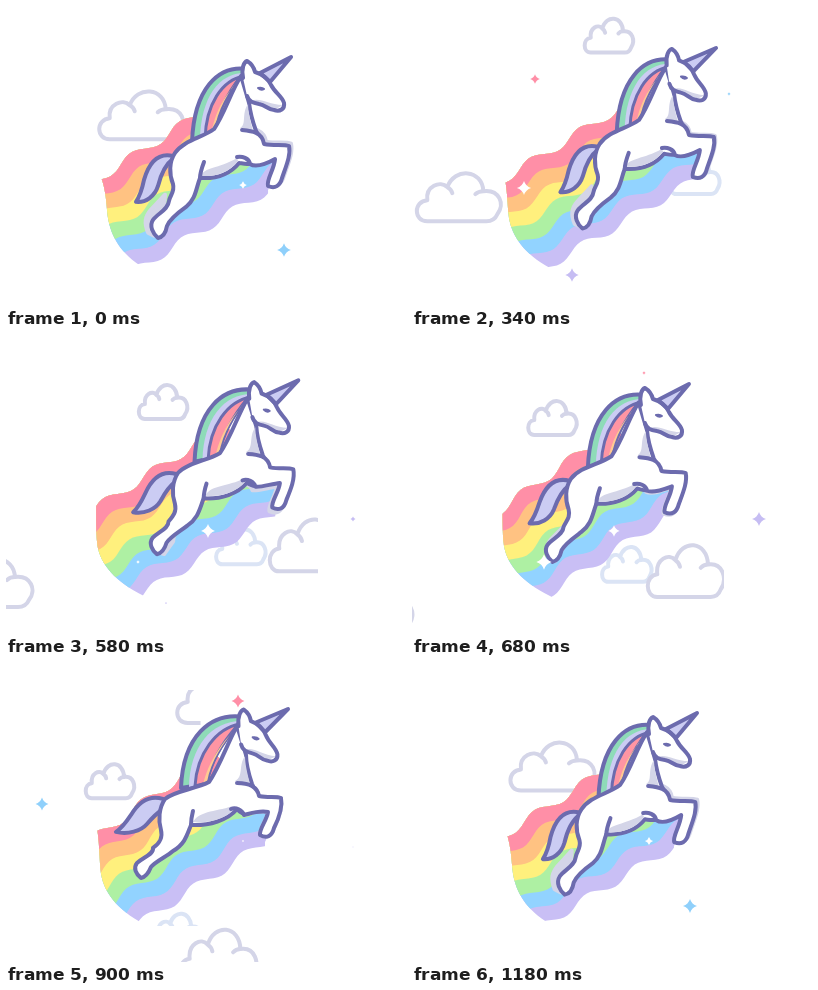
Write an HTML page that moves like this. It is 400 px wide and 300 px high and loops after 1.2 s.

```html
<!DOCTYPE html>
<html lang="en">
<head>
<meta charset="utf-8">
<title>Unicorn</title>
<style>
html, body { margin: 0; width: 100%; height: 100%; overflow: hidden; background: #fff; }
svg { display: block; width: 100%; height: 100%; }
path { stroke-linecap: round; stroke-linejoin: round; }
</style>
</head>
<body>
<svg id="stage" viewBox="0 0 400 300">
  <defs>
    <clipPath id="trail"><path id="trailEdge"/></clipPath>
    <clipPath id="c0"><rect id="reveal" y="28" height="272"/></clipPath>
    <clipPath id="c1"><rect width="400" height="300"/></clipPath>
    <clipPath id="c2"><rect width="316" height="264"/></clipPath>
    <clipPath id="c3"><rect width="312" height="300"/></clipPath>
  </defs>
  <g id="clouds"></g>
  <g id="rainbow" clip-path="url(#trail)"></g>
  <g id="unicorn"></g>
  <g id="sparks"></g>
</svg>
<script>
const LOOP = 1200, STRIDE = 400;
const INK = '#6c6bae', GREY = '#d4d5e8', LILAC = '#cbccf3';
const $ = id => document.getElementById(id);

function add(parent, attrs, tag = 'path') {
  const el = document.createElementNS('http://www.w3.org/2000/svg', tag);
  for (const k in attrs) el.setAttribute(k, attrs[k]);
  return parent.appendChild(el);
}

const lerp = (a, b, u) => a + (b - a) * u;
const mod = (a, n) => ((a % n) + n) % n;

// Smooth periodic curve through [time, value] keys.
function curve(keys, period) {
  const n = keys.length;
  const at = i => [keys[mod(i, n)][0] + Math.floor(i / n) * period, keys[mod(i, n)][1]];
  const slope = i => {
    const a = at(i - 1), b = at(i + 1);
    return (b[1] - a[1]) / (b[0] - a[0]);
  };
  return time => {
    const t = mod(time, period);
    let i = n - 1;
    while (i > 0 && keys[i][0] > t) i--;
    const a = at(i), b = at(i + 1), h = b[0] - a[0], u = (t - a[0]) / h;
    const u2 = u * u, u3 = u2 * u;
    return (2 * u3 - 3 * u2 + 1) * a[1] + (u3 - 2 * u2 + u) * h * slope(i)
      + (3 * u2 - 2 * u3) * b[1] + (u3 - u2) * h * slope(i + 1);
  };
}

const moveX = curve([[0, 0], [160, 11], [340, 19], [500, 20], [680, -8], [900, -3], [1180, 0]], LOOP);
const moveY = curve([[0, 0], [160, 2], [340, -9], [500, -8], [680, -1], [900, -4], [1180, 0]], LOOP);
const tilt = curve([[0, 0], [160, 5], [340, 4], [500, 5.5], [680, 0], [900, 4.5], [1180, 0]], LOOP);
const dent = curve([[0, 9], [160, 6], [340, 4], [500, -1], [680, -1], [900, 2], [1180, 8]], LOOP);
const stretch = curve([[0, 0], [100, 1], [160, 0.68], [280, 0.26], [340, 0.04]], STRIDE);
const swing = curve([[0, -4], [100, 0], [160, 6], [280, 2], [340, -2]], STRIDE);

// Clouds: position at t = 0, velocity per ms, size, lifetime
const CLOUD = 'M11 48C-3 48 -3 28 11 27C9 13 24 7 31 14C38 -6 66 -4 67 18C83 16 89 31 81 41C78 48 72 48 70 48Z'
  + 'M31 14Q35 16 36 20M67 18Q62 18 59 21';
const clouds = [
  { x: 93, y: 85, vx: -0.26, vy: 0.241, w: 85, h: 48, from: -380, to: 720, ink: GREY },
  { x: 229, y: -42, vx: -0.166, vy: 0.16, w: 49, h: 34, from: 0, to: 1170, ink: GREY },
  { x: 326, y: 93, vx: -0.2, vy: 0.176, w: 50, h: 35, from: 60, to: 1000, ink: '#dbe4f5' },
  { x: 426, y: 36, vx: -0.28, vy: 0.257, w: 77, h: 52, from: 400, to: 1060, ink: GREY }
];
clouds.forEach((c, i) => {
  const g = add($('clouds'), { 'clip-path': `url(#c${i})` }, 'g');
  c.el = add(g, {
    d: CLOUD, fill: '#fff', stroke: c.ink, 'stroke-width': 4, 'vector-effect': 'non-scaling-stroke'
  });
});

function drawClouds(t) {
  for (const c of clouds) {
    const s = t > LOOP + c.from ? t - LOOP : t;
    const on = s >= c.from && s < c.to;
    c.el.style.display = on ? '' : 'none';
    const x = c.x + c.vx * s, y = c.y + c.vy * s;
    c.el.setAttribute('transform', `translate(${x} ${y}) scale(${c.w / 85} ${c.h / 48})`);
  }
  $('reveal').setAttribute('width', t > 800 && t < 1100 ? 172 + (t - 860) * 0.55 : 400);
}

// Rainbow: later bands are painted first, each from the top edge down
const BANDS = ['#ff8fa7', '#ffc282', '#fff07d', '#aef0a3', '#92d3ff', '#c9bff5'];
const WAVE = 58;
const bandEls = BANDS.map((fill, i) => i).reverse().map(i => add($('rainbow'), { fill: BANDS[i] }));

function edge(k, t, ox, oy) {
  const v = k / 6, pts = [];
  const ax = lerp(95, 136, v), ay = lerp(171, 260, v);
  const bx = lerp(190, 264, v) + ox, by = lerp(110, 183, v) + oy;
  const len = Math.hypot(bx - ax, by - ay), nx = (ay - by) / len, ny = (bx - ax) / len;
  for (let s = -24; s <= len + 40; s += 4) {
    const along = s - 12 * v - 9 - WAVE * t / STRIDE;
    const d = 4.5 * Math.cos(2 * Math.PI * along / WAVE);
    pts.push((ax + ny * s + nx * d).toFixed(1) + ' ' + (ay - nx * s + ny * d).toFixed(1));
  }
  return pts;
}

function drawRainbow(t, ox, oy) {
  const top = edge(0, t, ox, oy).reverse();
  bandEls.forEach((el, i) => {
    el.setAttribute('d', 'M' + edge(6 - i, t, ox, oy).concat(top).join('L') + 'Z');
  });
  const e = dent(t);
  const end = [[262, 195], [262, 184], [269, 169], [268, 152], [240, 130], [212, 95]]
    .map(p => `L${p[0] + ox} ${p[1] + oy}`).join('');
  $('trailEdge').setAttribute('d', `M170 95L90 160C${92 + e} 180 ${91 + e} 198 ${93 + e} 212`
    + `C${96 + e} 230 ${110 + e / 2} 248 138 262L160 275${end}Z`);
}

// Unicorn: each part blends from a gathered pose to a stretched one
const parts = [];
let layer = $('unicorn');
function part(gathered, stretched, fill, stroke = 'none', width = 4) {
  const el = add(layer, { d: gathered, fill, stroke, 'stroke-width': width });
  if (stretched) {
    const b = stretched.match(/-?[\d.]+/g).map((n, i) => +n + 3 + i % 2);
    parts.push({ el, a: gathered, b });
  }
  return el;
}

const LEG = [
  'M236 124C246 125 256 126 258 138C268 140 278 138 283 140C285 149 280 160 276 172C274 180 269 183 262 180C260 174 268 164 269 153C260 158 250 162 244 158C243 152 236 150 231 151',
  'M231 121C240 121 251 123 253 134C262 136 270 134 275 136C277 146 272 158 268 166C266 174 261 177 254 173C253 167 261 158 262 150C254 148 246 151 238 153C236 148 230 145 225 147'
];

// far legs
const farFront = part(LEG[0], LEG[1], GREY, GREY);
const farHind = part('M163 190L149 205C143 212 142 218 146 228L152 231L161 215Z',
  'M149 188L134 200C130 204 130 208 134 213L137 213L146 203Z', GREY, GREY);
// tail
part('M167 150C150 146 142 160 138 174C136 184 134 190 130 196C140 197 149 190 152 180C155 168 160 158 167 153',
  'M157 137C141 132 131 143 125 153C119 162 115 167 110 170C122 173 135 169 141 162C147 155 151 151 157 147', LILAC, INK);
// mane
part('M241 63C212 59 188 83 186 136L207 130C210 104 222 84 235 70Z',
  'M238 55C204 50 177 75 175 126L200 122C204 100 216 80 231 64Z', '#8edbb8', INK);
part('M240 67C214 66 195 90 194 134L207 130C210 104 222 84 235 70Z',
  'M237 59C206 58 184 84 183 125L200 122C204 100 216 80 231 64Z', LILAC);
part('M238 70C216 74 200 98 199 133L208 128C212 104 224 84 235 70Z',
  'M234 62C210 66 191 92 189 124L201 121C205 100 217 80 231 64Z', '#ff95a3', INK, 3);
part('M237 72C221 84 208 106 205 130L208 127C211 104 223 84 235 70Z',
  'M233 64C217 78 202 100 197 123L201 120C205 98 218 80 231 64Z', '#ffca92');
// body and near hind leg
part('M235 70C225 85 219 107 208 123C196 132 178 134 169 147C163 156 163 168 167 178C169 186 164 189 163 195C162 204 152 207 147 214C143 220 147 228 152 232C158 231 160 226 161 220C164 213 173 206 180 201C190 193 190 182 194 172C210 173 224 168 233 157C240 158 246 160 247 152C258 150 257 135 250 125C246 114 244 106 243 97Z',
  'M231 64C221 82 214 104 203 120C190 127 168 129 159 137C153 146 152 158 155 168C157 176 154 181 147 186C148 192 138 195 131 201C127 206 130 212 135 216C140 215 143 210 145 205C150 199 160 195 167 189C179 182 181 173 185 163C203 164 222 158 231 147C236 152 240 154 242 148C252 146 252 133 246 122C242 110 240 102 240 93Z',
  '#fff', INK);
// shading
part('M195 170C198 161 212 163 231 152L232 155C224 166 210 171 195 170Z',
  'M187 160C194 148 212 150 229 143L230 145C222 156 204 162 187 160Z', GREY);
part('M242 98C235 108 241 118 234 122L247 125C244 114 242 105 242 98Z',
  'M239 94C232 104 238 114 229 119L244 122C241 110 239 102 239 94Z', GREY);
part('M198 156C195 164 194 168 194 172', 'M187 149C186 153 185 157 185 163', 'none', INK);
part(LEG[0], LEG[1], '#fff', INK);

// horn and head
const head = layer = add($('unicorn'), {}, 'g');
const FACE = 'M237 72C235 62 238 56 241 55C246 58 248 62 249 66C256 68 262 72 265 79C269 87 276 90 278 97C279 103 274 106 268 104C262 104 260 99 253 98C247 97 243 96 241 90';
part(FACE, '', '#fff');
part('M268 104C262 104 260 99 253 98L245 95C254 91 262 99 277 99Z', '', GREY);
part('M254 67L285 51L264 76Z', '', LILAC, INK);
part(FACE, '', 'none', INK);
part('M252 82Q255 85 258 83Q256 81 252 82', '', INK, INK, 2);

function drawUnicorn(t, ox, oy) {
  const w = stretch(t), far = swing(t);
  $('unicorn').setAttribute('transform', `translate(${ox} ${oy})`);
  head.setAttribute('transform', `rotate(${tilt(t)} 285 51)`);
  for (const p of parts) {
    let i = 0;
    p.el.setAttribute('d', p.a.replace(/-?[\d.]+/g, n => lerp(+n, p.b[i++], w).toFixed(2)));
  }
  farFront.setAttribute('transform', `translate(${-far / 2} ${far * 0.6})`);
  farHind.setAttribute('transform', `translate(${far} ${far / 3})`);
}

// Sparkles: x, y, size, start, duration, colour
const PINK = '#ff8fa7', BLUE = '#8fd0fb', VIOLET = '#c6bdf3', WHITE = '#fff';
const sparks = [
  [317, 88, 7.5, 20, 345, BLUE], [36, 142, 6.5, 750, 330, BLUE], [278, 244, 7, 1010, 340, BLUE],
  [123, 73, 7.5, 30, 400, PINK], [232, 39, 7, 650, 400, PINK],
  [160, 269, 7.5, 200, 400, VIOLET], [347, 185, 7.5, 540, 370, VIOLET],
  [112, 182, 8, 80, 400, WHITE], [202, 197, 7, 400, 400, WHITE],
  [132, 228, 8, 560, 300, WHITE], [237, 179, 4.5, 860, 500, WHITE]
].map(([x, y, size, from, span, fill]) => ({
  x, y, size, from, span,
  el: add($('sparks'), { fill, d: 'M0 -1Q.24 -.24 1 0Q.24 .24 0 1Q-.24 .24 -1 0Q-.24 -.24 0 -1Z' })
}));

function drawSparks(t) {
  for (const s of sparks) {
    const u = mod(t - s.from, LOOP) / s.span;
    const r = u < 1 ? s.size * Math.sin(Math.PI * u) : 0;
    s.el.setAttribute('transform', `translate(${s.x} ${s.y}) scale(${r})`);
  }
}

function draw() {
  const t = performance.now() % LOOP;
  const ox = moveX(t), oy = moveY(t);
  drawClouds(t);
  drawRainbow(t, ox, oy);
  drawUnicorn(t, ox, oy);
  drawSparks(t);
  requestAnimationFrame(draw);
}
draw();
</script>
</body>
</html>
```
